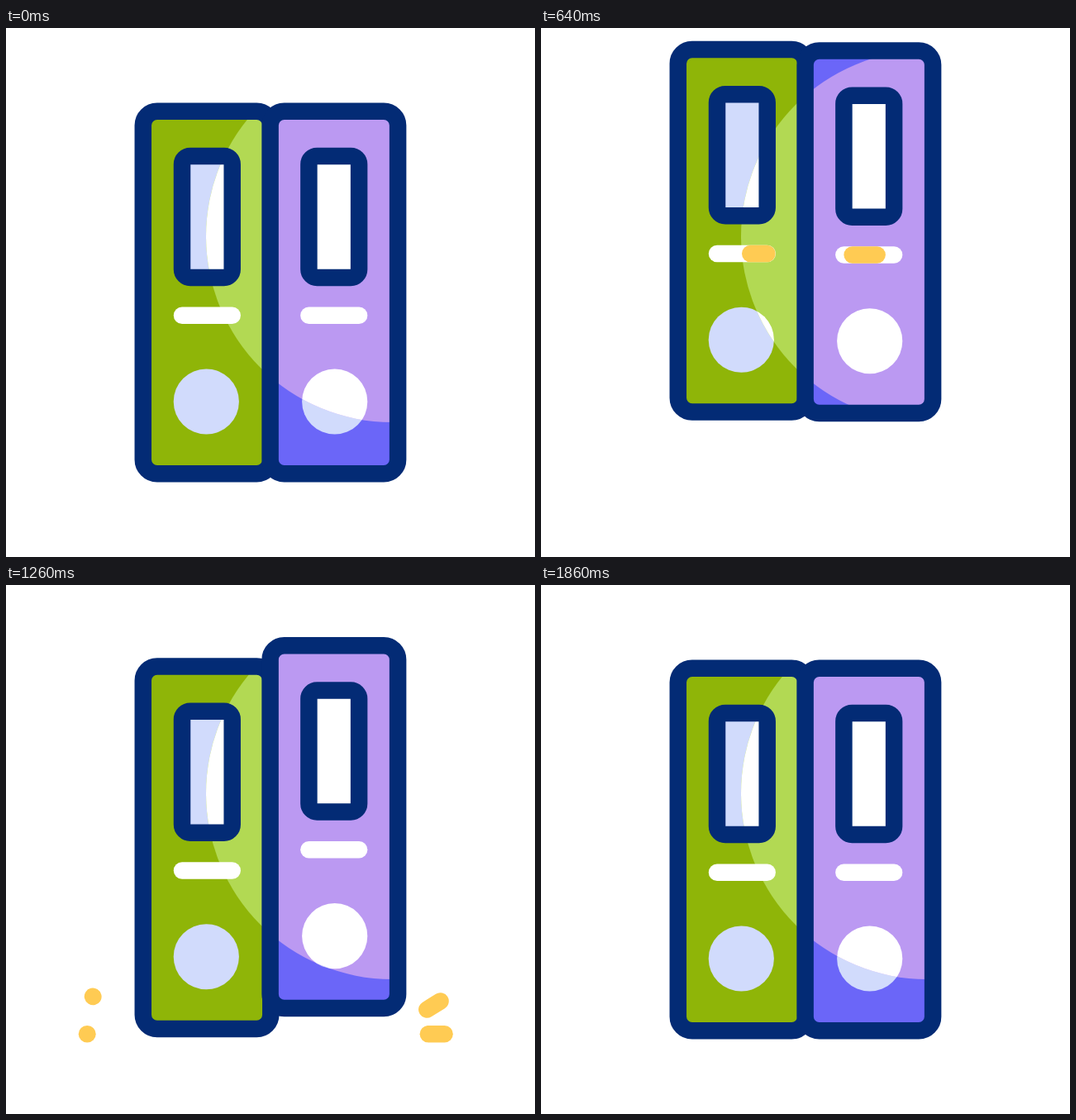
Animation, 640 px wide and 640 px high, one loop 2020 ms. Source, as an HTML page:

```html
<!DOCTYPE html>
<html lang="en">
<head>
<meta charset="utf-8">
<title>Binders</title>
<style>
  html, body { margin: 0; width: 100%; height: 100%; overflow: hidden; background: #fff; }
  svg { display: block; width: 100%; height: 100%; }
</style>
</head>
<body>
<svg id="stage" viewBox="0 0 640 640"></svg>
<script>
const LOOP = 2020, STEP = 20, LAG = 233;
const NAVY = '#032b75', YELLOW = '#ffcb53';

const binders = [
  { x: 165.8, label: 213, disc: 242.3, lag: 0, side: 1,
    base: '#8fb508', lit: '#b2d953' },
  { x: 319.6, label: 366.4, disc: 397.7, lag: LAG, side: -1,
    base: '#6b66f8', lit: '#bb99f2' }
];

// Sparks as seen on the left; the right pair is mirrored.
const sparks = [
  { x1: 131, y1: 514, x2: 105, y2: 497.8 },
  { x1: 129.6, y1: 543.2, x2: 98, y2: 543.2 }
];

const fills = (b, cover, paper) => `
  <rect x="${b.x}" y="100.7" width="154.5" height="438.6" rx="17" fill="${cover}"/>
  <rect x="${b.label}" y="154.9" width="60.7" height="147" fill="${paper}"/>
  <circle cx="${b.disc}" cy="452" r="39.6" fill="${paper}"/>`;

const outlines = b => `
  <g fill="none" stroke="${NAVY}" stroke-width="20.5">
    <rect x="${b.x}" y="100.7" width="154.5" height="438.6" rx="17"/>
    <rect x="${b.label}" y="154.9" width="60.7" height="147" rx="10"/>
  </g>
  <path d="M${b.label} 347.7h60.7" stroke="#fff"/>
  <line class="meter" stroke="${YELLOW}"/>`;

const binderMarkup = b => `
  <g class="binder">
    <g class="move">${fills(b, b.base, '#d1dbfc')}</g>
    <g clip-path="url(#glow)"><g class="move">${fills(b, b.lit, '#fff')}</g></g>
    <g class="move">${outlines(b)}</g>
    ${sparks.map(() => `<line class="spark" stroke="${YELLOW}"/>`).join('')}
  </g>`;

const stage = document.getElementById('stage');
stage.innerHTML = `
  <clipPath id="glow"><circle cx="467" cy="252" r="225"/></clipPath>
  <g stroke-width="20.5" stroke-linecap="round">
    <g stroke-width="0">${''}</g>
    ${binders.map(binderMarkup).join('')}
  </g>`;

document.querySelectorAll('.binder').forEach((node, i) => {
  const b = binders[i];
  b.moving = node.querySelectorAll('.move');
  b.meter = node.querySelector('.meter');
  b.sparks = node.querySelectorAll('.spark');
});

const mix = (a, b, k) => a + (b - a) * k;

function smooth(t, from, to) {
  const x = Math.min(1, Math.max(0, (t - from) / (to - from)));
  return x * x * (3 - 2 * x);
}

function bezier(x1, y1, x2, y2) {
  const at = (a, b, s) => 3 * (1 - s) * (1 - s) * s * a + 3 * (1 - s) * s * s * b + s * s * s;
  return x => {
    let lo = 0, hi = 1;
    for (let i = 0; i < 24; i++) {
      const mid = (lo + hi) / 2;
      if (at(x1, x2, mid) < x) lo = mid; else hi = mid;
    }
    return at(y1, y2, lo);
  };
}

const rise = bezier(0.167, 0, 0.37, 1);
const fall = bezier(0.667, 0, 0.833, 0.4);
const slowing = x => x * (2 - x);
const falling = x => x * x;

// Each hop: start, top and landing time, height, easing up and down.
const hops = [
  [0, 533, 901, 77.2, rise, fall],
  [901, 1055, 1251, 28.3, slowing, falling],
  [1251, 1372, 1480, 15.7, slowing, falling],
  [1480, 1553, 1627, 6, slowing, falling]
];

function heightAt(t) {
  const hop = hops.find(h => t >= h[0] && t < h[2]);
  if (!hop) return 0;
  const [start, top, land, height, up, down] = hop;
  return t < top
    ? height * up((t - start) / (top - start))
    : height * (1 - down((t - top) / (land - top)));
}

// Shows the part of a line between the fractions a and b.
function trim(line, p, a, b) {
  line.style.display = b - a > 0.001 ? '' : 'none';
  line.setAttribute('x1', mix(p.x1, p.x2, a));
  line.setAttribute('y1', mix(p.y1, p.y2, a));
  line.setAttribute('x2', mix(p.x1, p.x2, b));
  line.setAttribute('y2', mix(p.y1, p.y2, b));
}

function render(time) {
  for (const b of binders) {
    const t = time - b.lag;
    const shift = `translate(0 ${-heightAt(t)})`;
    b.moving.forEach(g => g.setAttribute('transform', shift));

    const track = { x1: b.label, y1: 347.7, x2: b.label + 60.7, y2: 347.7 };
    trim(b.meter, track, smooth(t, 233, 900), smooth(t, 0, 667));

    const mirror = x => b.side > 0 ? x : 639.6 - x;
    sparks.forEach((s, i) => trim(
      b.sparks[i],
      { ...s, x1: mirror(s.x1), x2: mirror(s.x2) },
      smooth(t, 1000, 1280), smooth(t, 867, 1133)
    ));
  }
}

function tick(now) {
  const time = now % LOOP;
  render(time - time % STEP);
  requestAnimationFrame(tick);
}

render(0);
requestAnimationFrame(tick);
</script>
</body>
</html>
```
